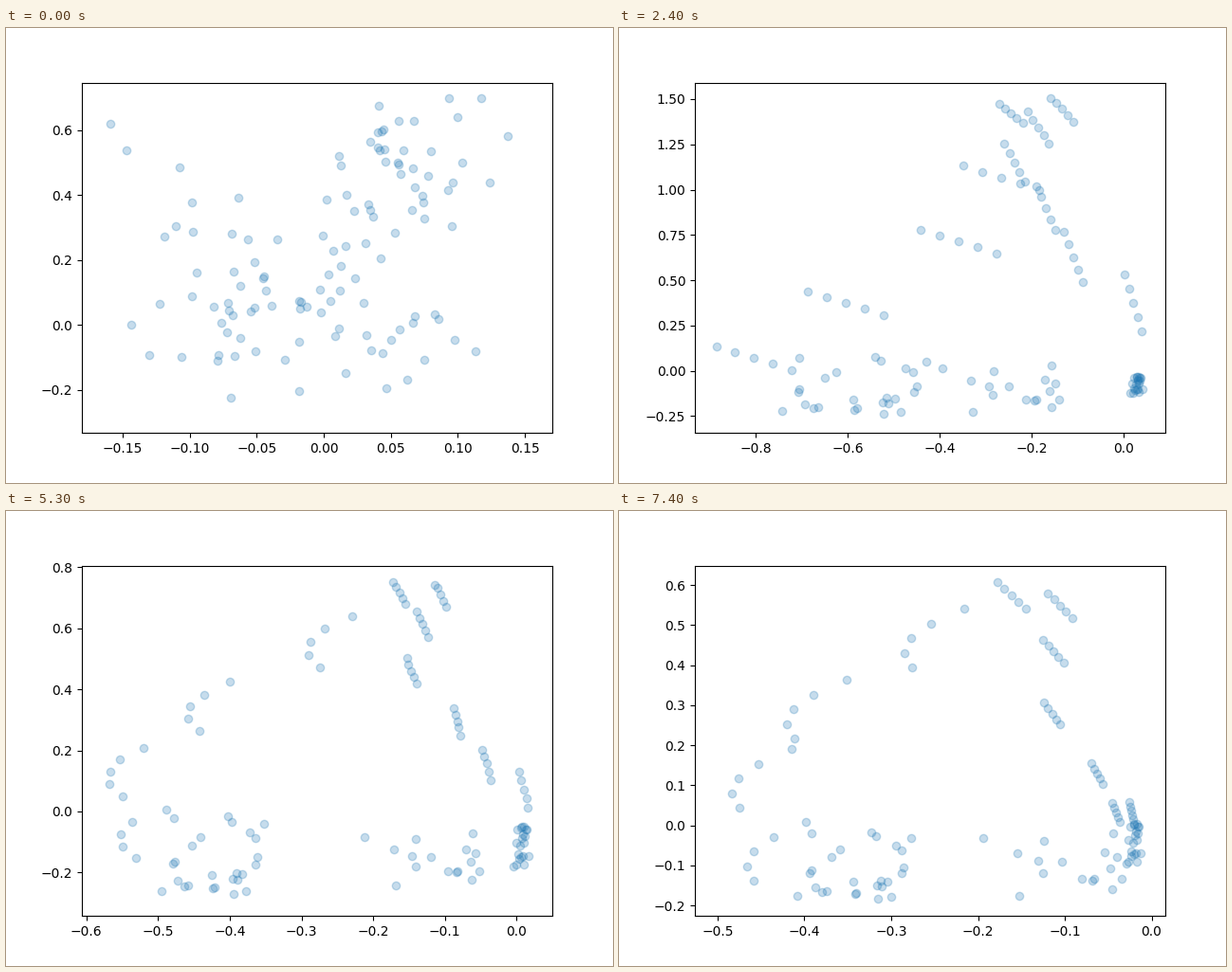
Write a matplotlib script that moves like this. It is 640x480 px and loops after 7500 ms.

```python
import numpy as np
import matplotlib.pyplot as plt
from matplotlib.animation import FuncAnimation

FRAMES, INTERVAL = 75, 100
LEFT, WIDTH, BASE, HEIGHT = 80, 496, 427.2, 369.6   # axes box on the stage
EDGE = 1 / 22                                       # default 5 % data margin
rng = np.random.default_rng(4)

# xmin, xmax, ymin, ymax while the view rescales
LIMIT_KEYS = np.array([0, 13, 24, 35, 53, 65, 74])
LIMITS = np.array([
    [-0.1804, 0.1704, -0.3325, 0.7466],
    [-0.4663, 0.0773, -0.2300, 2.1890],
    [-0.9318, 0.0896, -0.3426, 1.5910],
    [-0.8330, 0.0770, -0.3913, 1.2645],
    [-0.6060, 0.0496, -0.3426, 0.8059],
    [-0.5264, 0.0081, -0.2985, 0.7072],
    [-0.5262, 0.0158, -0.2265, 0.6483],
])
POSES = np.array([0, 13, 24, 35, 74])


def curve(anchors, n):
    """n points along the cubic through four evenly spaced anchors."""
    coef = np.polyfit(np.linspace(0, 1, 4), np.reshape(anchors, (4, 2)), 3)
    return np.vander(np.linspace(0, 1, n), 4) @ coef


def cloud(n, cx, cy, sx, sy):
    """Seeded loose scatter, the state before the groups form."""
    return rng.normal((cx, cy), (sx, sy), (n, 2))


def right_arm(spine, first, last):
    """Seven rows of five dots; the row direction turns along the arm."""
    rows = curve(spine, 7)
    rows[1, 0] += 30
    rows[3, 0] -= 25
    turn = np.linspace(first, last, 7)
    step = np.linspace(-0.5, 0.5, 5)[None, :, None]
    return (rows[:, None] + step * turn[:, None]).reshape(-1, 2)


def left_arm(spine, span, bow):
    """Four hooks of five dots that share one span and bow."""
    u = np.linspace(0, 1, 5)[:, None]
    hook = (u - 0.5) * span + (4 * u * (1 - u) - 0.5) * [bow, 0]
    return (curve(spine, 4)[:, None] + hook).reshape(-1, 2)


def blob(n, *poses):
    """A fixed random patch that moves and stretches."""
    patch = rng.uniform(-1.7, 1.7, (n, 2))
    return [patch * pose[2:] + pose[:2] for pose in poses]


groups = [
    [cloud(35, 430, 135, 48, 42),
     right_arm((195, 85, 290, 115, 321, 174, 470, 262), (25, 20), (80, 55)),
     right_arm((413, 90, 442, 105, 450, 190, 542, 290), (25, 20), (18, 60)),
     right_arm((415, 84, 430, 105, 456, 192, 549, 283), (5, 22), (14, 48)),
     right_arm((414, 89, 458, 148, 504, 277, 540, 316), (30, 28), (4, 18))],
    [cloud(20, 245, 225, 80, 65),
     left_arm((350, 223, 385, 283, 149, 328, 268, 336), (100, 25), 0),
     left_arm((403, 158, 358, 225, 239, 290, 142, 348), (80, 25), 0),
     left_arm((350, 143, 220, 205, 112, 272, 124, 332), (-5, 46), -25),
     left_arm((322, 134, 198, 209, 140, 282, 156, 359), (-55, 62), -28)],
    [cloud(25, 235, 295, 45, 42),
     *blob(25, (420, 382, 65, 16), (250, 376, 48, 18),
           (205, 357, 32, 26), (250, 373, 38, 21))],
    [cloud(16, 385, 325, 50, 30),
     *blob(16, (430, 378, 50, 18), (405, 380, 38, 15),
           (425, 364, 32, 15), (460, 372, 45, 20))],
    [cloud(20, 385, 240, 50, 50),
     *blob(20, (540, 395, 8, 9), (546, 376, 4, 6),
           (544, 357, 5, 14), (543, 350, 5, 14))],
]

stage = np.concatenate([np.array(g) for g in groups], axis=1)
dots = np.stack([(stage[..., 0] - LEFT) / WIDTH,
                 (BASE - stage[..., 1]) / HEIGHT], axis=-1)
dots = dots.clip(EDGE, 1 - EDGE)


def glide(keys, values, t):
    """Monotone cubic through the keys, without overshoot."""
    steps = np.diff(keys)
    d = np.diff(values, axis=0) / steps.reshape(-1, *[1] * (values.ndim - 1))
    prod = d[:-1] * d[1:]
    total = np.where(prod > 0, d[:-1] + d[1:], 1)
    inner = np.where(prod > 0, 2 * prod / total, 0)
    slope = np.concatenate([d[:1], inner, d[-1:]])
    i = min(np.searchsorted(keys, t, side="right") - 1, len(steps) - 1)
    h = steps[i]
    u = (t - keys[i]) / h
    ease = u * u * (3 - 2 * u)
    return (values[i] * (1 - ease) + values[i + 1] * ease
            + h * u * (1 - u) * ((1 - u) * slope[i] - u * slope[i + 1]))


fig, ax = plt.subplots(figsize=(6.4, 4.8), dpi=100)
line, = ax.plot([], [], "o", color="tab:blue", alpha=0.25)


def update(frame):
    x0, x1, y0, y1 = glide(LIMIT_KEYS, LIMITS, frame)
    pos = glide(POSES, dots, frame)
    line.set_data(x0 + pos[:, 0] * (x1 - x0), y0 + pos[:, 1] * (y1 - y0))
    ax.set_xlim(x0, x1)
    ax.set_ylim(y0, y1)
    return line,


anim = FuncAnimation(fig, update, frames=FRAMES, interval=INTERVAL,
                     repeat=True, repeat_delay=0)
plt.show()
```
